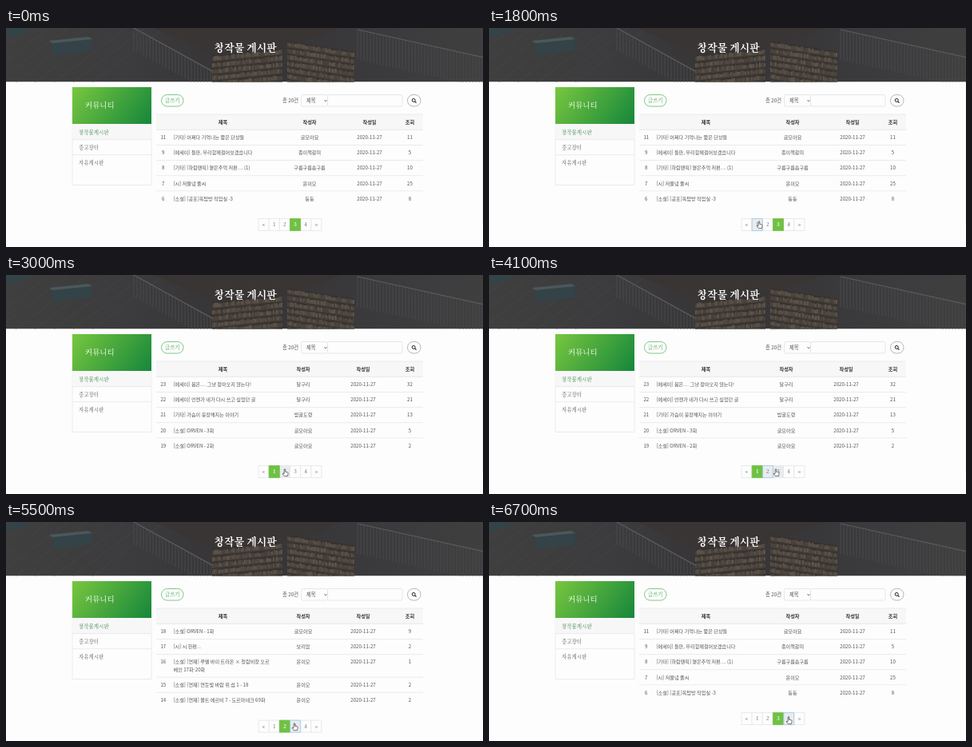
Write an HTML page with a canvas that moves like this. It is 597x274 px and loops after 7 s.

```html
<!DOCTYPE html>
<html lang="ko">
<head>
<meta charset="utf-8">
<title>창작물 게시판</title>
<style>
html, body { margin: 0; width: 100%; height: 100%; overflow: hidden; background: #fdfdfd; }
canvas { display: block; width: 597px; height: 274px; }
</style>
</head>
<body>
<canvas id="stage" width="597" height="274"></canvas>
<script>
const W = 597, H = 274, LOOP = 7000, STEP = 100, LAST_STEP = 6700;
const BANNER_H = 67.6, BANNER_DELAY = 200;
const ctx = document.getElementById('stage').getContext('2d');
const SANS = '"Noto Sans CJK KR", "Noto Sans KR", "Noto Sans", sans-serif';
const SERIF = '"Noto Serif CJK KR", "Noto Serif KR", "Noto Sans CJK KR", "Noto Serif", serif';
const LINE = '#e6e8ea', GREEN = '#6fc143', DATE = '2020-11-27';

// One post per line: number | title (/ wraps) | author | views
const PAGES = [
  `23|[에세이] 봄은.... 그냥 찾아오지 않는다!|달구리|32
   22|[에세이] 언젠가 네가 다시 쓰고 싶었던 글|달구리|21
   21|[기타] 가슴이 웅장해지는 이야기|밤골도령|13
   20|[소설] ORVEN - 3화|글모아요|5
   19|[소설] ORVEN - 2화|글모아요|2`,
  `18|[소설] ORVEN - 1화|글모아요|9
   17|[시] 시 한편...|보리맘|2
   16|[소설] [연재] 루멜 바이 트라온 × 청람비창 오르/베인 17화-20화|윤이모|1
   15|[소설] [연재] 연둣빛 바람 위 섬 1 - 18|윤이모|2
   14|[소설] [연재] 몰트 에르비 7 - 도르마네크 69화|윤이모|2`,
  `11|[기타] 어쩌다 기억나는 짧은 단상들|글모아요|11
   9|[에세이] 들판, 우리함께걸어보겠습니다|종이책갈피|5
   8|[기타] [하람팬픽] 옅은추억 저편.... (1)|구름구름솜구름|10
   7|[시] 저물녘 풀씨|윤이모|25
   6|[소설] [공포]옥탑방 작업실 -3|둥둥|8`
].map(page => page.split('\n').map(row => row.trim().split('|')));

const CLICKS = [
  { page: 1, at: 1700, loaded: 2500 },
  { page: 2, at: 3900, loaded: 4200 },
  { page: 3, at: 5500, loaded: 5900 },
  { page: 4, at: 6500, loaded: Infinity }
];

const ENTRY = { x: 378, y: 274 };
const MOVES = [
  { from: 200, to: 1500, x: 338, y: 242 },
  { from: 2600, to: 2900, x: 349, y: 243 },
  { from: 3900, to: 4100, x: 359, y: 243 },
  { from: 4900, to: 5200, x: 361, y: 252 },
  { from: 5700, to: 6000, x: 372, y: 252 },
  { from: 6000, to: 6400, x: 375, y: 244 }
];

const ease = k => k * k * (3 - 2 * k);

function pointerAt(t) {
  if (t < MOVES[0].from) return null;
  return MOVES.reduce((p, { from, to, x, y }) => {
    const k = ease(Math.min(1, Math.max(0, (t - from) / (to - from))));
    return { x: p.x + (x - p.x) * k, y: p.y + (y - p.y) * k };
  }, ENTRY);
}

function stateAt(t) {
  const loaded = CLICKS.filter(c => c.loaded <= t).pop();
  const pending = CLICKS.find(c => c.at <= t && t < c.loaded);
  return {
    page: loaded ? loaded.page : 3,
    focus: pending ? pending.page : -1,
    loading: !!loaded && t < loaded.loaded + BANNER_DELAY
  };
}

function text(str, x, y, { size = 6.15, color = '#505356', align = 'left', weight = 400, font = SANS } = {}) {
  ctx.font = `${weight} ${size}px ${font}`;
  ctx.fillStyle = color;
  ctx.textAlign = align;
  ctx.textBaseline = 'alphabetic';
  ctx.fillText(str, x, y + size * 0.36);
}

function rect(x, y, w, h, fill, stroke, radius = 0) {
  ctx.beginPath();
  ctx.roundRect(x, y, w, h, radius);
  if (fill) { ctx.fillStyle = fill; ctx.fill(); }
  if (stroke) { ctx.strokeStyle = stroke; ctx.lineWidth = 0.8; ctx.stroke(); }
}

function poly(points, fill, stroke, width = 1, close = true) {
  ctx.beginPath();
  points.forEach(([x, y]) => ctx.lineTo(x, y));
  if (close) ctx.closePath();
  if (fill) { ctx.fillStyle = fill; ctx.fill(); }
  if (stroke) { ctx.strokeStyle = stroke; ctx.lineWidth = width; ctx.stroke(); }
}

const line = (x0, y0, x1, y1, color, width = 0.8) =>
  poly([[x0, y0], [x1, y1]], null, color, width, false);

function random(seed) {
  return () => (seed = (seed * 16807) % 2147483647) / 2147483647;
}

function bookWall(x0, x1, top, slope, rnd) {
  const width = x1 - x0, rise = width * slope;
  poly([[x0, top], [x1, top + rise], [x1, 70], [x0, 70]], '#373230');
  for (let y = top + 7; y < 90; y += 8) {
    for (let x = x0; x < x1; x += 2) {
      const tone = 72 + rnd() * 28, h = 4 + rnd() * 2;
      rect(x, y + (x - x0) * slope - h, 1.7, h, `rgb(${tone},${tone * 0.91},${tone * 0.81})`);
    }
    line(x0, y + 0.6, x1, y + rise + 0.6, '#4a423c', 0.8);
  }
}

function slats(x0, x1, top, slope, height, color) {
  for (let x = x0; x < x1; x += 4) {
    const y = top + (x - x0) * slope;
    line(x, y, x, y + height, color, 1);
  }
  line(x0, top, x1, top + (x1 - x0) * slope, '#5c5b5c', 1.2);
}

function bench(x, y, w) {
  poly([[x, y + 5], [x + w, y], [x + w, y + 14], [x, y + 20]], '#334347');
  poly([[x, y + 5], [x + w, y], [x + w - 5, y - 3], [x - 4, y + 2]], '#4a595b');
}

function photo() {
  const rnd = random(41);
  const shade = ctx.createLinearGradient(0, 0, W, 0);
  ['#403f3f', '#3c3b3d', '#363435', '#3a393b', '#403f40'].forEach((c, i) => shade.addColorStop(i / 4, c));
  rect(0, 0, W, BANNER_H, shade);
  for (let i = 0; i < 8; i++) line(i * 24 - 60, 68, i * 24 + 30, 0, '#474544', 0.8);
  bench(0, -8, 26);
  bench(58, 14, 50);
  slats(160, 262, 0, 0.55, 28, '#48484a');
  poly([[185, 0], [420, 0], [368, 20], [262, 34]], '#393534');
  bookWall(258, 346, 34, -0.1, rnd);
  bookWall(352, 436, 16, 0.16, rnd);
  slats(440, W, 2, 0.22, 38, '#48484a');
}

function banner(loading) {
  ctx.save();
  ctx.beginPath();
  ctx.rect(0, 0, W, BANNER_H);
  ctx.clip();
  if (loading) rect(0, 0, W, H, '#494949'); else photo();
  ctx.restore();
  text('창작물 게시판', 299.7, 24, { size: 12.9, color: '#fff', align: 'center', weight: 600, font: SERIF });
}

function sidebar() {
  const green = ctx.createLinearGradient(90, 66, 175, 128);
  green.addColorStop(0, '#77c63f');
  green.addColorStop(1, '#16873b');
  rect(83, 120, 99, 76.5, '#fdfdfd', LINE);
  rect(83, 120, 99, 19.5, '#f7f7f8');
  rect(83, 74, 99, 46, green);
  text('커뮤니티', 99, 97, { size: 9.5, color: '#fff', weight: 500, font: SERIF });
  ['창작물게시판', '중고장터', '자유게시판'].forEach((label, i) => {
    const y = 130.3 + i * 19.1;
    if (i) line(83, y - 9.8, 182, y - 9.8, LINE);
    text(label, 91, y, { size: 6.5, font: SERIF, color: i ? '#5c5c5c' : '#3d8746', weight: i ? 400 : 500 });
  });
}

function toolbar() {
  rect(194.5, 83.5, 27.5, 14.5, '#fdfdfd', '#63b96b', 7.2);
  text('글쓰기', 208.2, 91, { size: 6.5, color: '#3ea552', align: 'center', font: SERIF });
  text('총 20건', 366, 91, { size: 6.3, align: 'right' });
  rect(369.5, 83.5, 33, 14.5, '#fdfdfd', '#dfe2e4', 2);
  rect(402.5, 83.5, 93.5, 14.5, '#fdfdfd', '#dfe2e4', 2);
  text('제목', 376, 91, { size: 6.3 });
  poly([[398.5, 90.3], [400, 91.8], [401.5, 90.3]], null, '#444', 0.9, false);
  rect(502.5, 83.5, 16.5, 14.5, '#fdfdfd', '#a2a5a8', 7.2);
  ctx.beginPath();
  ctx.arc(510.2, 90.4, 2, 0, 7);
  ctx.strokeStyle = '#222';
  ctx.lineWidth = 1;
  ctx.stroke();
  line(511.7, 91.9, 513.5, 93.7, '#222', 1.2);
}

// Returns the extra height taken by wrapped titles.
function table(page) {
  const author = page === 3 ? 380 : 372, date = author + 75, views = 505.5;
  rect(188, 108, 334, 19, '#f7f7f8');
  line(188, 108, 522, 108, LINE);
  line(188, 127.3, 522, 127.3, '#e0e3e5');
  [['제목', 271.5], ['작성자', author], ['작성일', date], ['조회', views]].forEach(([label, x]) =>
    text(label, x, 117.7, { color: '#333', weight: 600, align: 'center', size: 6.2 }));
  let y = 137, extra = 0;
  PAGES[page - 1].forEach(([id, title, name, count], i) => {
    if (i) line(188, y - 9.6, 522, y - 9.6, LINE);
    const lines = title.split('/');
    lines.forEach((part, n) => text(part, 209.5, y + n * 9.5));
    [[id, 196.8], [name, author], [DATE, date], [count, views]].forEach(([value, x]) =>
      text(value, x, y, { align: 'center' }));
    const wrap = (lines.length - 1) * 9.5;
    extra += wrap;
    y += 19.1 + wrap;
  });
  return extra;
}

const PAGER = { x: 316, y: 238.6, w: 13.15, h: 15 };

function hoveredCell(pointer, top) {
  if (!pointer || pointer.y < top || pointer.y > top + PAGER.h - 2) return -1;
  return Math.floor((pointer.x - PAGER.x) / PAGER.w);
}

function pager(top, page, focus, hover) {
  const { x, w, h } = PAGER;
  const cell = (i, fill, stroke) => rect(x + i * w, top, w, h, fill, stroke);
  const labels = ['«', '1', '2', '3', '4', '»'];
  labels.forEach((_, i) => cell(i, i === hover || i === focus ? '#e9ecef' : '#fdfdfd', '#e2e5e8'));
  cell(page, GREEN, GREEN);
  if (focus > 0) cell(focus, null, '#9cc9e6');
  labels.forEach((label, i) => text(label, x + (i + 0.5) * w, top + h / 2, {
    size: 6.5, align: 'center', color: i === page ? '#fff' : '#5c5c5c', weight: i === page ? 600 : 400, font: SERIF
  }));
}

function cursor({ x, y }, isHand) {
  ctx.save();
  ctx.translate(x, y);
  ctx.lineJoin = 'round';
  const shape = isHand
    ? [[-0.8, 0], [0.7, 0], [0.7, 3.3], [3.6, 3.9], [4.2, 5], [3.5, 8.6], [-0.6, 8.6], [-3, 5.4], [-0.8, 5.4]]
    : [[0, 0], [0, 6], [1.4, 4.8], [2.3, 6.6], [3.2, 6.2], [2.3, 4.5], [4, 4.3]];
  poly(shape, '#fff', '#555', 0.8);
  ctx.restore();
}

function draw(t) {
  const { page, focus, loading } = stateAt(t);
  const pointer = pointerAt(t);
  rect(0, 0, W, H, '#fdfdfd');
  line(596.5, 68, 596.5, 246, '#eeeeee');
  banner(loading);
  sidebar();
  toolbar();
  const top = PAGER.y + table(page);
  const hover = hoveredCell(pointer, top);
  pager(top, page, focus, hover);
  if (pointer) cursor(pointer, hover >= 0);
}

const start = performance.now();
function tick() {
  const t = (performance.now() - start) % LOOP;
  draw(Math.min(LAST_STEP, Math.floor(t / STEP) * STEP));
  requestAnimationFrame(tick);
}
tick();
</script>
</body>
</html>
```
